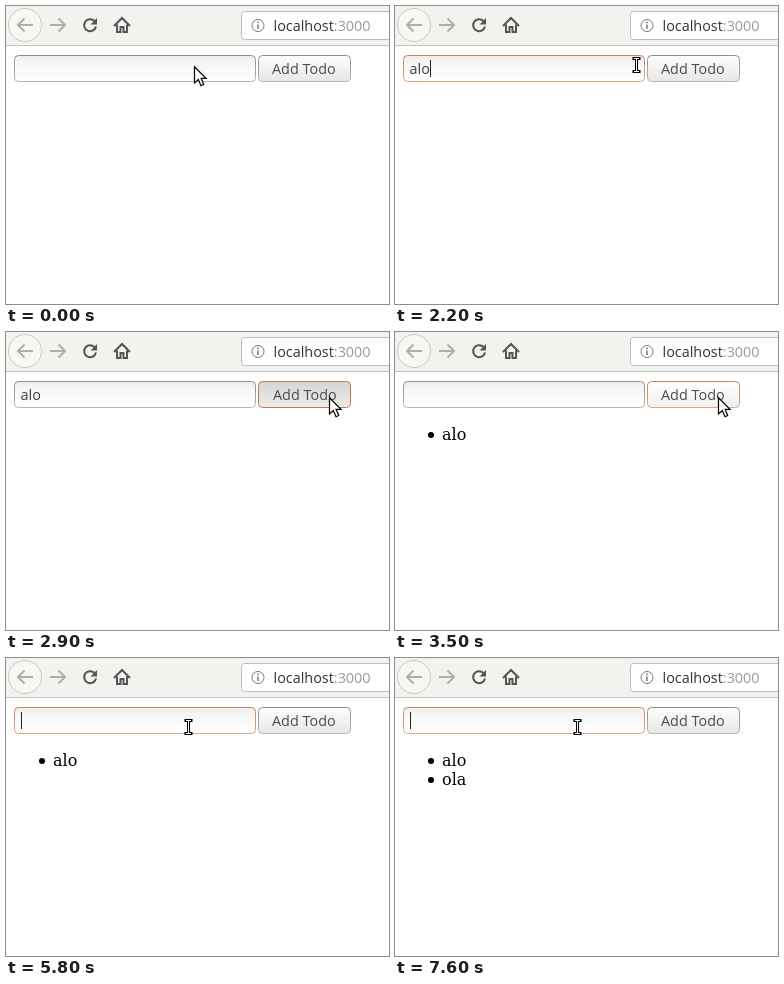
These frames come from a looping animation (383 by 298 pixels, 8000 ms). An HTML page:

```html
<!DOCTYPE html>
<html lang="en">
<head>
<meta charset="utf-8">
<title>Todo list</title>
<style>
html, body { margin: 0; width: 100%; height: 100%; overflow: hidden; background: #fff; }
svg { display: block; }
.ui { font: 14.4px "Open Sans", "Noto Sans", sans-serif; }
.item { font: 16px "DejaVu Serif", serif; }
.icon { fill: none; stroke: #555; stroke-width: 2; }
.off { stroke: #aeaeab; }
</style>
</head>
<body>
<svg width="383" height="298" viewBox="0 0 383 298">
  <defs>
    <linearGradient id="field" x2="0" y2="1">
      <stop stop-color="#ededed"/><stop offset=".3" stop-color="#f6f6f6"/><stop offset="1" stop-color="#fff"/>
    </linearGradient>
    <linearGradient id="up" x2="0" y2="1">
      <stop stop-color="#fdfdfd"/><stop offset="1" stop-color="#e8e7e5"/>
    </linearGradient>
    <linearGradient id="hover" x2="0" y2="1">
      <stop stop-color="#fff"/><stop offset="1" stop-color="#f0efed"/>
    </linearGradient>
    <linearGradient id="down" x2="0" y2="1">
      <stop stop-color="#d6d6d6"/><stop offset="1" stop-color="#ebebea"/>
    </linearGradient>
    <linearGradient id="grey" x2="0" y2="1">
      <stop stop-color="#8d8d8b"/><stop offset="1" stop-color="#b5b5b2"/>
    </linearGradient>
    <linearGradient id="orange" x2="0" y2="1">
      <stop stop-color="#c98561"/><stop offset="1" stop-color="#dda686"/>
    </linearGradient>
  </defs>

  <!-- Browser toolbar -->
  <rect width="383" height="39" fill="#f2f2ee"/>
  <rect y="39" width="383" height="1" fill="#c3c3bf"/>
  <circle cx="19" cy="19" r="16.5" fill="#f8f8f3" stroke="#cacac6"/>
  <path class="icon off" d="M27 19H12M18.5 12.5L12 19l6.5 6.5"/>
  <path class="icon off" d="M44 19h15M52.500 12.500L59 19l-6.500 6.500"/>
  <path class="icon" d="M88.500 15A6 6 0 1 0 90 20.500"/>
  <path d="M91 12v6.500h-6.500z" fill="#555"/>
  <path class="icon" d="M108 20l8-8 8 8M111 18.500V26h3.500v-5h3v5h3.500v-7.500"/>
  <rect x="235.500" y="5.500" width="160" height="28" rx="3" fill="#fff" stroke="#bdbdb9"/>
  <circle cx="252" cy="19.500" r="6" fill="none" stroke="#777"/>
  <path d="M252 18.500v4.500M252 15.500v1.700" stroke="#777" stroke-width="1.500"/>
  <text class="ui" x="267.500" y="25" fill="#333">localhost<tspan fill="#999">:3000</tspan></text>

  <!-- Form -->
  <rect id="input" x="8.500" y="49.500" width="241" height="26" rx="4" fill="url(#field)"/>
  <text id="value" class="ui" x="14.500" y="68" fill="#3c3c3c"></text>
  <rect id="caret" y="54" width="1" height="17" fill="#222"/>
  <rect id="button" x="252.500" y="49.500" width="92" height="26" rx="4"/>
  <text id="label" class="ui" y="68" fill="#4c4c4c">Add Todo</text>

  <!-- List -->
  <g id="first"><circle cx="36" cy="103" r="3"/><text class="item" x="47" y="108">alo</text></g>
  <g id="second"><circle cx="36" cy="122" r="3"/><text class="item" x="47" y="127">ola</text></g>

  <!-- Pointers -->
  <path id="arrow" d="M.5.800V17L4.300 13.500 7 19.700 9.700 18.500 7.100 12.300H12Z" fill="#fff" stroke="#000" stroke-width="1.200"/>
  <g id="beam" fill="none" stroke-linecap="square">
    <path d="M-2.500-6.500h5M-2.500 6.500h5M0-6.500v13" stroke="#000" stroke-width="3"/>
    <path d="M-2.500-6.500h5M-2.500 6.500h5M0-6.500v13" stroke="#fff" stroke-linecap="butt"/>
  </g>
</svg>
<script>
const LOOP = 8000;
const $ = id => document.getElementById(id);
const show = (id, on) => $(id).setAttribute("visibility", on ? "visible" : "hidden");
const last = (track, t) => track.filter(k => k[0] <= t).pop();

// Each entry starts with its time in ms.
const pointer = [
  [0, "arrow", 188, 60], [200, "beam", 190.5, 63], [2200, "beam", 241.5, 59],
  [2400, "arrow", 294, 63], [2500, "arrow", 323, 65], [5200, "arrow", 274, 42],
  [5300, "beam", 238.5, 53], [5400, "beam", 208.5, 62], [5500, "beam", 189.5, 67],
  [5600, "beam", 182.5, 69]
];
const typing = [
  [0, ""], [1200, "a"], [1400, "al"], [1600, "alo"], [3500, ""],
  [6600, "o"], [6800, "ol"], [7000, "ola"], [7600, ""]
];
const focus = [[0, ""], [300, "input"], [2900, "button"], [5800, "input"]];
const press = [[0, "up"], [2400, "hover"], [2900, "down"], [3500, "hover"], [5200, "up"]];

function draw(t) {
  const [, shape, x, y] = last(pointer, t);
  for (const id of ["arrow", "beam"]) show(id, id === shape);
  $(shape).setAttribute("transform", `translate(${x} ${y})`);

  const text = last(typing, t)[1], focused = last(focus, t)[1], state = last(press, t)[1];
  for (const id of ["input", "button"])
    $(id).setAttribute("stroke", `url(#${id === focused ? "orange" : "grey"})`);
  if (state === "down") $("button").setAttribute("stroke", "#c8744c");
  $("button").setAttribute("fill", `url(#${state})`);
  $("label").setAttribute("x", state === "down" ? 267 : 266);

  $("value").textContent = text;
  const end = text ? $("value").getComputedTextLength() : 0;
  $("caret").setAttribute("x", Math.round(15 + end));
  show("caret", focused === "input" && !(t >= 2700 && t < 2900));
  show("first", t >= 3500);
  show("second", t >= 7600);
}

const start = performance.now();
function tick() {
  draw((performance.now() - start) % LOOP);
  requestAnimationFrame(tick);
}
tick();
</script>
</body>
</html>
```
